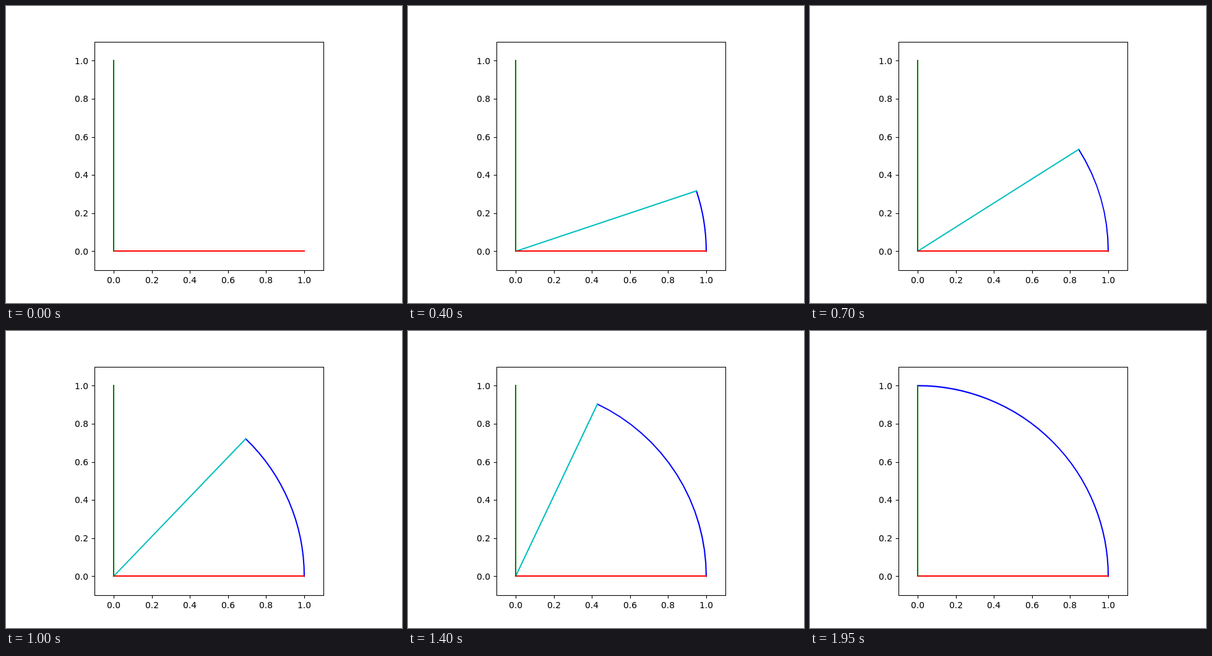
Write an HTML page with a canvas that moves like this. It is 640x480 px and loops after 2 s.

```html
<!DOCTYPE html>
<html lang="en">
<head>
<meta charset="utf-8">
<title>Quarter circle</title>
<style>
  html, body { margin: 0; width: 100%; height: 100%; overflow: hidden; background: #fff; }
  canvas { display: block; }
</style>
</head>
<body>
<canvas id="stage" width="640" height="480"></canvas>
<script>
const ctx = document.getElementById('stage').getContext('2d');
const X0 = 174, Y0 = 396.4, R = 308;
const STEPS = 40, STEP_MS = 50;

// Pixel-centred position for one-pixel lines
const snap = v => Math.round(v) + 0.5;

function line(color, x1, y1, x2, y2) {
  ctx.strokeStyle = color;
  ctx.beginPath();
  ctx.moveTo(x1, y1);
  ctx.lineTo(x2, y2);
  ctx.stroke();
}

function drawAxes() {
  ctx.lineWidth = 1.11;
  ctx.lineCap = 'butt';
  ctx.fillStyle = '#000';
  ctx.font = '13.89px "DejaVu Sans", sans-serif';
  for (let i = 0; i <= 5; i++) {
    const label = (i / 5).toFixed(1);
    const x = X0 + R * i / 5, y = Y0 - R * i / 5;
    line('#000', snap(x), 427.5, snap(x), 432.4);
    line('#000', 138.6, snap(y), 143.5, snap(y));
    ctx.fillText(label, Math.round(x - 11.04), 448);
    ctx.fillText(label, 111, Math.round(y + 5.2));
  }
}

function drawFrame(step) {
  const angle = step / (STEPS - 1) * Math.PI / 2;
  ctx.fillStyle = '#fff';
  ctx.fillRect(0, 0, 640, 480);
  drawAxes();

  ctx.lineWidth = 2.08;
  ctx.lineCap = 'square';
  if (step > 0) {
    ctx.strokeStyle = '#00f';
    ctx.beginPath();
    ctx.arc(X0, Y0, R, 0, -angle, true);
    ctx.stroke();
  }
  // At both ends the radius lies hidden under a fixed side
  if (step > 0 && step < STEPS - 1) {
    line('#00bfbf', X0, Y0, X0 + R * Math.cos(angle), Y0 - R * Math.sin(angle));
  }
  line('#f00', X0, 396, X0 + R, 396);
  line('#008000', X0, 396, X0, 88);

  ctx.lineWidth = 1.11;
  ctx.strokeStyle = '#000';
  ctx.strokeRect(143.5, 58.5, 370, 369);
}

const start = performance.now();
function tick() {
  const time = performance.now() - start;
  drawFrame(Math.floor(time / STEP_MS) % STEPS);
  requestAnimationFrame(tick);
}
tick();
</script>
</body>
</html>
```
